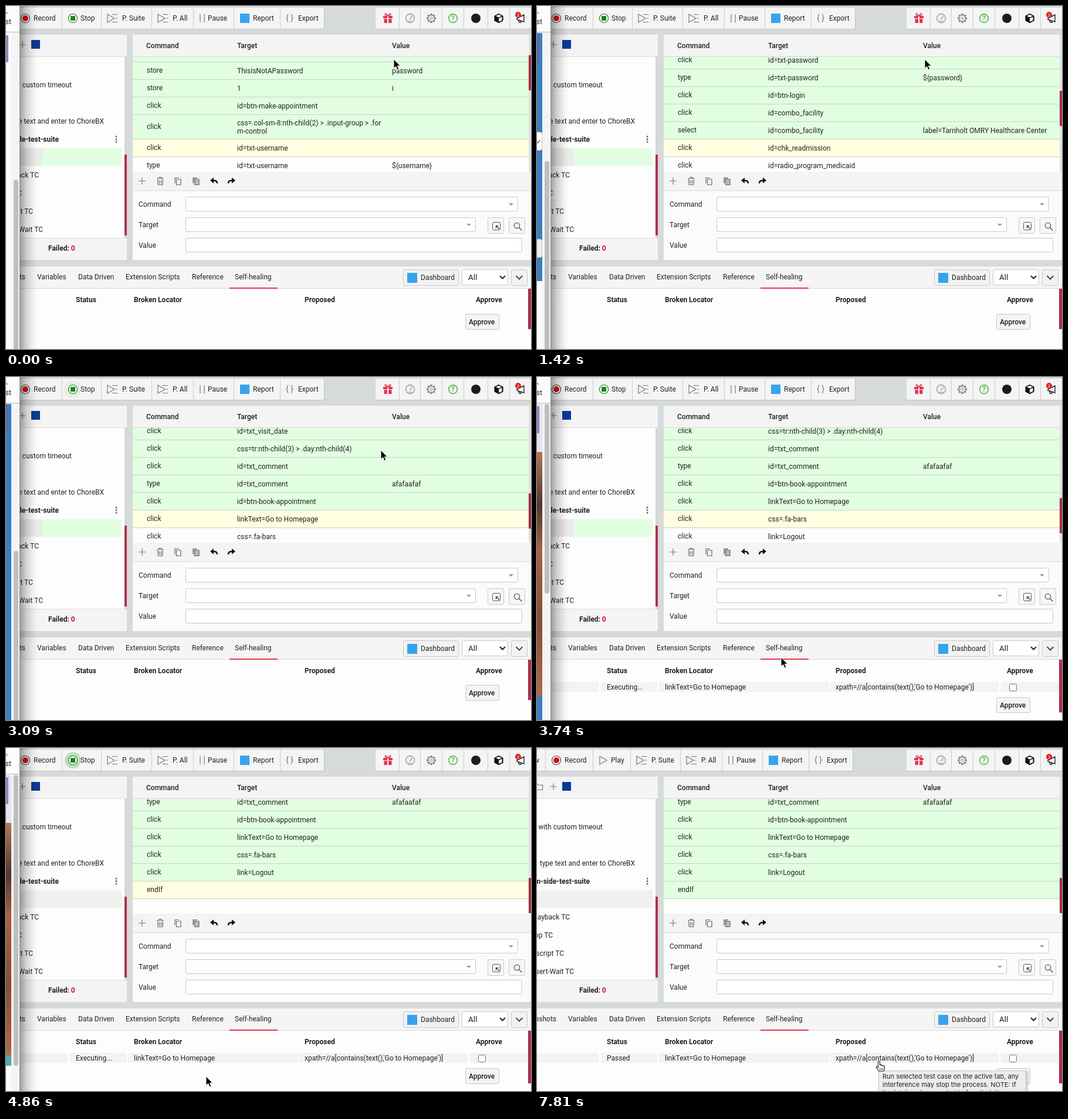
An HTML page for the animation above (8000 ms loop, 895 px wide and 586 px high).

```html
<!DOCTYPE html>
<html lang="en">
<head>
<meta charset="utf-8">
<title>Test recorder</title>
<style>
html, body { margin: 0; width: 100%; height: 100%; overflow: hidden; background: #d6dada; }
svg { display: block; width: 895px; height: 586px; font: 12px Roboto, Arial, sans-serif; }
text { fill: #222; white-space: pre; }
</style>
</head>
<body>
<svg id="stage" viewBox="0 0 895 586"></svg>
<script>
const LOOP = 8000;
const stage = document.getElementById('stage');

const rect = (x, y, w, h, fill, more = '') =>
  `<rect x="${x}" y="${y}" width="${w}" height="${h}" fill="${fill}" ${more}/>`;
const box = (x, y, w, h, fill = '#fff', r = 2, stroke = '#c8c8c8') =>
  rect(x + .5, y + .5, w - 1, h - 1, fill, `rx="${r}" stroke="${stroke}"`);
const text = (x, y, s, more = '') =>
  `<text x="${x}" y="${y}" ${more}>${s.replace(/</g, '&lt;').replace(/>/g, '&gt;')}</text>`;
const path = (d, stroke = '#555', fill = 'none', w = 1.2) =>
  `<path d="${d}" stroke="${stroke}" fill="${fill}" stroke-width="${w}"/>`;
const circle = (x, y, r, fill, more = '') =>
  `<circle cx="${x}" cy="${y}" r="${r}" fill="${fill}" ${more}/>`;
const group = (id, body, more = '') => `<g id="${id}" ${more}>${body}</g>`;
const BOLD = 'font-weight="700"', MEDIUM = 'font-weight="500"', END = 'text-anchor="end"';

const rows = [
  ['store', 'admin', 'username'],
  ['store', 'ThisIsNotAPassword', 'password'],
  ['store', '1', 'i'],
  ['click', 'id=btn-make-appointment'],
  ['click', 'css=.col-sm-8:nth-child(2) > .input-group > .for|m-control'],
  ['click', 'id=txt-username'],
  ['type', 'id=txt-username', '${username}'],
  ['click', 'css=.col-sm-offset-4 .form-control'],
  ['click', 'id=txt-password'],
  ['type', 'id=txt-password', '${password}'],
  ['click', 'id=btn-login'],
  ['click', 'id=combo_facility'],
  ['select', 'id=combo_facility', 'label=Tarnholt OMRY Healthcare Center'],
  ['click', 'id=chk_readmission'],
  ['click', 'id=radio_program_medicaid'],
  ['click', 'id=txt_visit_date'],
  ['click', 'css=tr:nth-child(3) > .day:nth-child(4)'],
  ['click', 'id=txt_comment'],
  ['type', 'id=txt_comment', 'afafaafaf'],
  ['click', 'id=btn-book-appointment'],
  ['click', 'linkText=Go to Homepage'],
  ['click', 'css=.fa-bars'],
  ['click', 'link=Logout'],
  ['endIf', '']
];
const tops = [];
let listHeight = 0;
for (const r of rows) {
  tops.push(listHeight);
  listHeight += r[1].includes('|') ? 42 : 30;
}

// [time, running row]; the last entry means all rows have passed
const progress = [[0, 5], [60, 7], [130, 8], [190, 10], [260, 11], [1420, 13], [1500, 15],
  [1580, 17], [1650, 19], [1740, 20], [3440, 21], [3980, 22], [4400, 23], [4970, 24]];
const pages = [[0, 'login'], [700, 'form'], [2090, 'done'], [3680, 'home'], [4400, 'menu']];
const arrowPath = [[0, 661, 91], [2950, 661, 91], [3150, 630, 139], [3300, 500, 330], [3440, 416, 479],
  [3800, 416, 479], [4100, 341, 561], [5850, 341, 561], [5860, 341, 572]];
const returnPath = [[7110, 495, 574], [7350, 545, 556], [7630, 583, 535]];

const at = (steps, t) => steps.filter(s => s[0] <= t).pop()[1];
function along(points, t) {
  let i = 0;
  while (i < points.length - 2 && points[i + 1][0] <= t) i++;
  const [a, b] = [points[i], points[i + 1]];
  const k = Math.min(1, Math.max(0, (t - a[0]) / (b[0] - a[0])));
  return [a[1] + (b[1] - a[1]) * k, a[2] + (b[2] - a[2]) * k];
}

function listRow([command, target, value = ''], i) {
  const y = tops[i], lines = target.split('|'), h = lines.length > 1 ? 42 : 30;
  return rect(216, y, 675, h, '#fff', `id="row${i}"`) + rect(216, y + h - 1, 675, 1, '#c3d5c3') +
    text(240, y + h / 2 + 3, command) +
    lines.map((s, n) => text(394, y + 19 + n * 14 - (h > 30 ? 1 : 0), s)).join('') +
    text(658, y + 19, value);
}

const triangle = x => path(`M${x} 14L${x + 12} 21L${x} 28Z`, '#777');
const playLines = x => triangle(x) + path(`M${x + 8} 14.5h9M${x + 14} 21h3M${x + 8} 27.5h9`, '#777');

function tools(play) {
  const d = play ? -4 : 0, e = play ? -3 : 0;
  const lines = [14, 95, 162 + e, 248 + d, 319 + d, 388 + d, 467 + d];
  return rect(-5, 3, 548 + d, 37, '#bfc3c3', 'rx="2"') + rect(-5, 3, 547 + d, 36, '#f4f4f4', 'rx="2"') +
    lines.map(x => rect(x, 3, 1, 36, '#cacccc')).join('') +
    text(4, 25, 'New', END) +
    circle(33, 21, 7.5, '#fff', 'stroke="#444" stroke-width="1.2"') + circle(33, 21, 5, '#e00b0b') +
    text(47, 25, 'Record') +
    (play ? triangle(107) + text(126, 25, 'Play')
      : circle(114, 21, 8, '#3a3', 'id="glow"') +
        circle(114, 21, 7.5, '#fff', 'stroke="#287a28" stroke-width="1.2"') +
        rect(110, 17, 8, 8, '#128a12') + text(127, 25, 'Stop')) +
    playLines(173 + e) + text(198 + e, 25, 'P. Suite') +
    playLines(259 + d) + text(284 + d, 25, 'P. All') +
    path(`M${331 + d} 14v14M${338 + d} 14v14`, '#777') + text(344 + d, 25, 'Pause') +
    rect(399 + d, 13, 16, 16, '#37a3ee') + text(421 + d, 25, 'Report') +
    text(477 + d, 25, '{ }', 'font-size="14" style="fill:#777"') + text(498 + d, 25, 'Export');
}

function sideIcons() {
  const teeth = [...Array(8)].map((_, i) =>
    `<rect x="723.3" y="13" width="3.4" height="3" fill="#888" transform="rotate(${i * 45} 725 21)"/>`).join('');
  return rect(630, 3, 270, 37, '#bfc3c3', 'rx="2"') + rect(630, 3, 270, 36, '#f4f4f4', 'rx="2"') +
    [670, 706, 743, 780, 821, 858].map(x => rect(x, 3, 1, 36, '#cacccc')).join('') +
    rect(643, 17, 16, 4, '#e2364f') + rect(644.5, 22, 13, 7, '#e2364f') + rect(650, 17, 2, 12, '#fff') +
    path('M651 17C645 17 645 12 648 13L651 17L654 13C657 12 657 17 651 17', '#e2364f', 'none', 1.4) +
    circle(689, 21, 7.5, 'none', 'stroke="#999" stroke-width="1.3"') +
    path('M688 23L693 17M684 22h1M689 16v1M693 22h1M685 26h8', '#999') +
    teeth + circle(725, 21, 5.5, '#f4f4f4', 'stroke="#888" stroke-width="1.4"') +
    circle(725, 21, 2.2, 'none', 'stroke="#888"') +
    circle(762, 21, 7.3, 'none', 'stroke="#3fb52c" stroke-width="1.4"') +
    text(762, 25.3, '?', `text-anchor="middle" ${MEDIUM} style="fill:#3fb52c"`) +
    circle(801, 21, 8, '#1b1b1b') +
    path('M840 13.5L847 17V25L840 28.5L833 25V17Z', '#111', '#111') +
    path('M840 21V27L845.5 24.5V18.5ZM835 17L840 14.8L845 17L840 19.5Z', 'none', '#f4f4f4') +
    path('M871 21L883 15V27L871 23ZM873 23L875 28H878L877 25', '#222', 'none', 1.4) +
    circle(873, 15, 5, '#dd1f1f') + text(873, 18, '2', 'text-anchor="middle" font-size="8" style="fill:#fff"');
}

function sidebar() {
  const items = [[139, 112, 'with custom timeout'], [201, 167, 'type text and enter to ChoreBX'],
    [232, 90, 'm-side-test-suite', BOLD], [293, 56, 'Playback TC'], [324, 27, 'Loop TC'],
    [355, 46, 'Run script TC'], [386, 63, 'Assert-Wait TC']];
  return rect(0, 49, 206, 385, '#fdfdfd') + rect(0, 49, 206, 37, '#f4f4f4') + rect(0, 86, 206, 1, '#dcdcdc') +
    path('M-4 61.5h5l1.5 2h7v8h-14', '#777') + path('M28 60.5v11M22.5 66h11', '#777') +
    rect(43, 58, 15, 15, '#0b3a94') +
    rect(202, 87, 4, 309, '#d3d7d7') + rect(202, 254, 4, 138, '#b0304c') +
    rect(0, 243, 197, 30, '#e1fee1', 'id="caseRow"') + rect(0, 243, 62, 30, '#ebecea', 'id="caseLeft"') +
    items.map(([y, x, s, more = '']) => text(x, y, s, `${END} ${more}`)).join('') +
    [223, 227.5, 232].map(y => circle(188, y, 1.5, '#666')).join('') +
    rect(0, 396, 206, 38, '#f4f4f4') + rect(0, 396, 206, 1, '#dcdcdc') +
    `<text x="72" y="418" ${BOLD}>Failed: <tspan fill="#d8121c">0</tspan></text>`;
}

function editor() {
  const copy = (x, fill) => path(`M${x} 303V293.5h7M${x + 2.5} 296h7.5v9.5h-7.5z`, '#666', fill);
  const caret = (x, y) => `<path d="M${x - 4} ${y}h8l-4 4z" fill="#999"/>`;
  return rect(216, 283, 679, 33, '#f4f4f4') + rect(216, 315, 679, 1, '#dadada') + rect(216, 316, 679, 118, '#fbfbfb') +
    path('M232 293v12M226 299h12', '#777') +
    path('M257.5 294.5h11M261 294v-1.500h4V294M258.500 295.500l.8 10h7.400l.8-10M261.500 297.500v6M264.500 297.500v6', '#666') +
    copy(288, 'none') + copy(319, '#bbb') +
    path('M360 303C360 298 356 298 352 298', '#111', 'none', 2.4) + path('M348 298l6-5v10z', 'none', '#111') +
    path('M379 303C379 298 383 298 387 298', '#111', 'none', 2.4) + path('M391 298l-6-5v10z', 'none', '#111') +
    text(226, 343, 'Command') + text(226, 378, 'Target') + text(226, 413, 'Value') +
    box(306, 326, 567, 25) + box(306, 361, 495, 25) + box(306, 396, 574, 25) +
    caret(861, 337) + caret(789, 372) +
    box(821, 361, 28, 28, '#f7f7f7') + box(857, 361, 28, 28, '#f7f7f7') +
    box(829, 369, 14, 14, 'none', 2, '#555') + path('M841 381l-5-5M835.5 379.500v-4h4', '#333') +
    circle(871, 375, 4.7, 'none', 'stroke="#555" stroke-width="1.3"') + path('M874.500 378.500l5 5', '#555', 'none', 1.5);
}

function bottomPanel() {
  const tabs = [[53, 'Variables'], [123, 'Data Driven'], [204, 'Extension Scripts'], [317, 'Reference'], [390, 'Self-healing']];
  const heads = [[119, 'Status'], [218, 'Broken Locator'], [509, 'Proposed'], [801, 'Approve']];
  const cells = [[0, 105], [109, 96], [208, 290], [500, 287], [791, 98]];
  return rect(0, 445, 895, 141, '#fdfdfd') + rect(0, 445, 895, 37, '#f5f5f5') + rect(0, 482, 895, 1, '#d9d9d9') +
    text(33, 467, 'Screenshots', END) + tabs.map(([x, s]) => text(x, 467, s)).join('') +
    rect(381, 481, 82, 2, '#e8364f') +
    box(677, 450, 95, 28, '#f2f2f2') + rect(684, 456, 17, 17, '#37a3ee') + text(707, 468, 'Dashboard') +
    box(777, 450, 79, 27, '#fff', 3) + text(788, 468, 'All', 'font-size="13.33"') +
    path('M842 461l4.500 4.500 4.500-4.500', '#222', 'none', 2) +
    box(861, 450, 28, 28, '#f2f2f2') + path('M869.500 461l5.500 5.500 5.500-5.500', '#444', 'none', 2) +
    heads.map(([x, s]) => text(x, 506, s, BOLD)).join('') +
    rect(890, 483, 5, 69, '#b0304c', 'id="panelThumb"') +
    group('healRow', cells.map(([x, w]) => rect(x, 521, w, 17, '#f3f3f3')).join('') +
      '<text id="status" x="119" y="534"></text>' + text(218, 534, 'linkText=Go to Homepage') +
      text(509, 534, "xpath=//a[contains(text(),'Go to Homepage')]") + box(805, 524, 13, 13, '#fff', 2, '#777')) +
    group('approve', box(783, 526, 58, 27, '#f4f4f4') + text(789, 544, 'Approve', MEDIUM));
}

function browser() {
  const thumb = (y, h) => rect(13, y, 8, h, '#bebebe', 'rx="4"');
  const tab = rect(0, 50, 4, 46, '#8c8ac6');
  const photo = (y, h) => rect(0, y, 9, h, 'url(#fur)');
  const pagesArt = {
    login: tab + thumb(297, 300),
    form: rect(0, 46, 9, 424, '#3a7fc0') + rect(0, 50, 4, 46, '#5a68b4') +
      box(-4, 215, 13, 32, '#fff', 3) + path('M0 232l1.500 2 3.500-5', '#444') +
      box(-4, 398, 13, 32, '#ececec', 3) + thumb(265, 330),
    done: rect(0, 46, 9, 540, '#3a7fc0') + rect(0, 50, 4, 46, '#5a68b4') + thumb(297, 300),
    home: rect(0, 46, 9, 84, '#e4e4ee') + tab + photo(128, 417) + rect(0, 545, 9, 41, '#3a7fc0') + thumb(46, 324),
    menu: rect(0, 46, 9, 84, '#e4e4ee') + tab + photo(128, 398) + rect(0, 525, 9, 18, '#55a7a6') + thumb(46, 497)
  };
  return rect(24, 0, 30, 586, 'url(#shade)') + rect(0, 0, 24, 586, '#fcfcfc') +
    text(9, 31, 'Request', END) + path('M-1 9l4 4', '#777') +
    rect(0, 44, 24, 1, '#b9b9b9') + rect(9, 45, 14, 541, '#f4f4f4') +
    Object.entries(pagesArt).map(([id, art]) => group(id, art)).join('') +
    rect(23, 0, 1, 586, '#8d8d8d');
}

function tooltip() {
  const lines = ['Run selected test case on the active tab, any', 'interference may stop the process. NOTE: If',
    'the tab is not connected before that, the run'];
  return rect(583, 552, 255, 40, '#000', 'opacity=".12"') + box(582, 551, 252, 50, '#ececec', 0, '#c4c4c4') +
    lines.map((s, i) => text(589, 565 + i * 14, s, 'font-size="11" font-family="Inter, Roboto, sans-serif"')).join('');
}

stage.innerHTML = `<defs>
  <linearGradient id="shade"><stop offset="0" stop-opacity=".36"/><stop offset=".35" stop-opacity=".17"/>
    <stop offset=".7" stop-opacity=".06"/><stop offset="1" stop-opacity="0"/></linearGradient>
  <linearGradient id="fur" x2="0" y2="1"><stop stop-color="#b47655"/><stop offset=".22" stop-color="#51372f"/>
    <stop offset=".4" stop-color="#a76344"/><stop offset=".7" stop-color="#8a4c33"/><stop offset="1" stop-color="#b06a49"/></linearGradient>
  <clipPath id="listClip"><rect x="216" y="87" width="679" height="196"/></clipPath></defs>` +
  rect(0, 0, 895, 586, '#d6dada') +
  group('stopTools', tools(false)) + group('playTools', tools(true)) + sideIcons() + sidebar() +
  rect(216, 49, 679, 234, '#fdfdfd') +
  group('listView', group('list', rows.map(listRow).join('')), 'clip-path="url(#listClip)"') +
  rect(216, 49, 679, 37, '#f4f4f4') + rect(216, 86, 679, 1, '#d3d7d3') +
  text(239, 72, 'Command', MEDIUM) + text(394, 72, 'Target', MEDIUM) + text(658, 72, 'Value', MEDIUM) +
  rect(891, 49, 4, 234, '#e2e5e5') + rect(891, 84, 4, 60, '#a82f49', 'id="listThumb"') +
  editor() + bottomPanel() + group('browser', browser()) + group('tip', tooltip()) +
  group('arrow', path('M0 0V15.500L3.600 12.300L6.200 18L8.800 16.900L6.300 11.300H11.200Z', '#fff', '#000', 1)) +
  group('hand', path('M-1.500 1.500C-1.500 -.5 1.500 -.5 1.500 1.500V7C2 5.500 4.500 6 4.500 7.500C5.500 6.500 7 7 7.200 8.300C8.500 7.500 9.500 8.500 9.500 10V13L8 17H0L-4.500 11C-5.500 9 -3.500 8.500 -1.500 10.500Z', '#111', '#fff', 1.1) +
    path('M1.500 12v3M4 12v3M6.500 12v3', '#111', 'none', .9));

const el = {};
stage.querySelectorAll('[id]').forEach(n => el[n.id] = n);
const show = (id, on) => el[id].style.display = on ? '' : 'none';
const place = (id, x, y) => el[id].setAttribute('transform', `translate(${x} ${y})`);

function drawList(t) {
  const cur = at(progress, t), top = tops[Math.min(cur, rows.length - 1)];
  rows.forEach((_, i) => el['row' + i].setAttribute('fill', i < cur ? '#e1fee1' : i === cur ? '#fffee0' : '#fdfdfd'));
  place('list', 0, 228 - top);
  el.listThumb.setAttribute('y', 84 + Math.round((top - tops[5]) * .256));
}

function drawPointer(t) {
  const back = t >= 7110;
  const [x, y] = along(back ? returnPath : arrowPath, t);
  const onLink = back && y < 540;
  show('arrow', !onLink && (back || t < 5910));
  show('hand', onLink);
  place(onLink ? 'hand' : 'arrow', Math.round(x), Math.round(y));
}

function draw(t) {
  drawList(t);
  drawPointer(t);

  const playing = t < 5380;
  show('stopTools', playing);
  show('playTools', !playing);
  const pulse = ((t + 1600) % 2000) / 750;
  el.glow.setAttribute('r', 8 + 7 * Math.min(1, pulse * 1.4));
  el.glow.setAttribute('opacity', pulse < 1 && t > 400 && t < 5000 ? .3 * Math.sin(Math.PI * pulse) : 0);

  const running = t < 4480, healed = t >= 3440;
  el.caseRow.setAttribute('fill', running ? '#e1fee1' : '#eef1ed');
  show('caseLeft', running);
  show('healRow', healed);
  el.status.textContent = t < 4970 ? 'Executing...' : 'Passed';
  place('approve', 0, healed ? 21 : 0);
  el.panelThumb.setAttribute('height', healed ? 90 : 69);

  show('browser', t < 6330);
  const page = at(pages, t);
  pages.forEach(([, id]) => show(id, id === page));
  show('tip', t >= 7810);
}

function tick() {
  draw(performance.now() % LOOP);
  requestAnimationFrame(tick);
}
tick();
</script>
</body>
</html>
```
